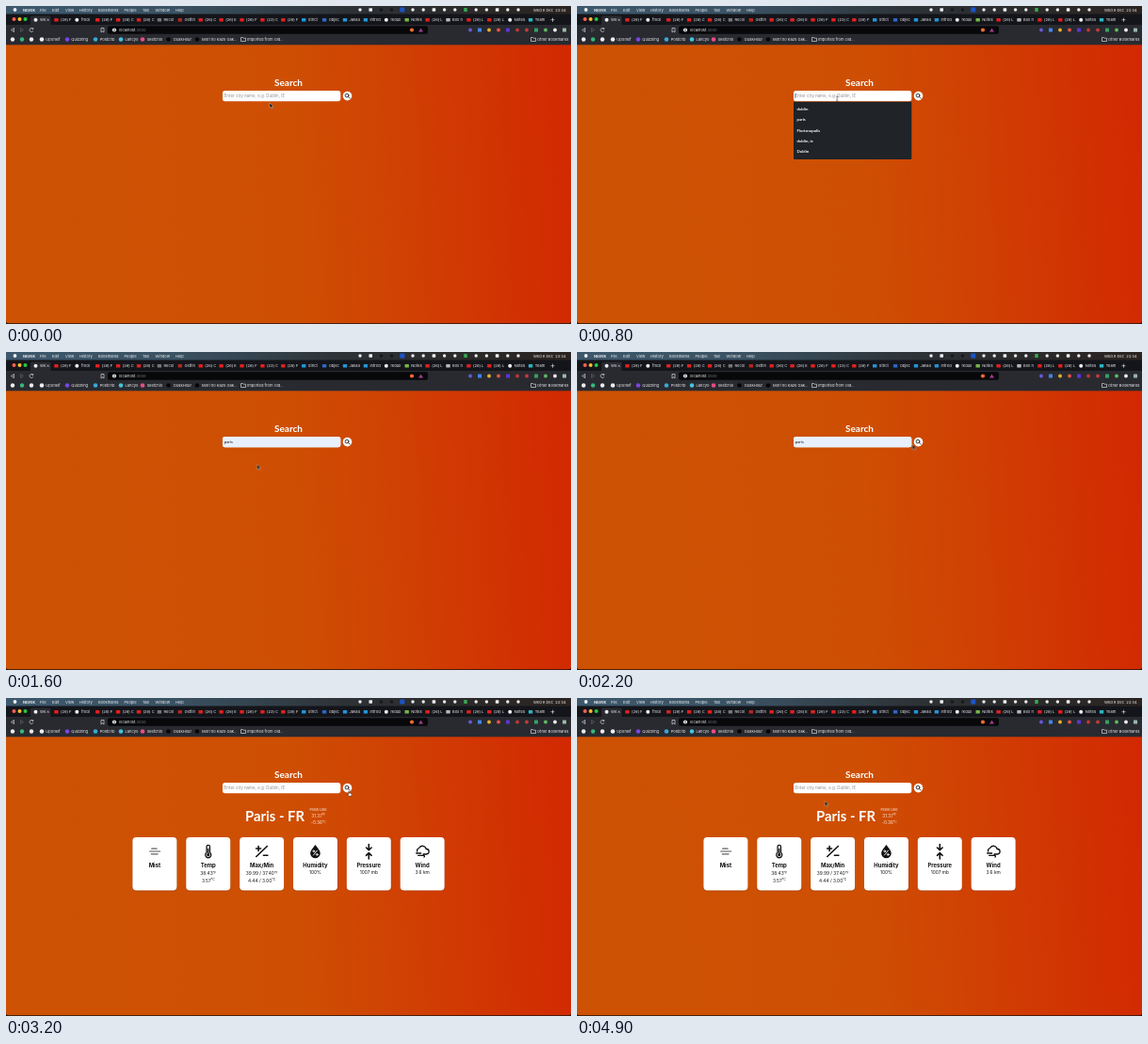
An HTML page for the animation above (5 s loop, 600x338 px).

```html
<!DOCTYPE html>
<html lang="en">
<head>
<meta charset="utf-8">
<title>Weather search</title>
<style>
html, body { margin: 0; width: 100%; height: 100%; overflow: hidden; background: #cf5204; }
svg { display: block; width: 100vw; height: 100vh; font-family: Inter, sans-serif; }
text { white-space: pre; }
.lato { font-family: Lato, sans-serif; font-weight: 700; fill: #fff; }
.mid { text-anchor: middle; }
.ui { font-size: 4.05px; fill: #eceef0; }
.line { fill: none; stroke: #111; stroke-width: 1.3; stroke-linecap: round; stroke-linejoin: round; }

.step { animation: 5s step-end infinite; }
#menu { animation-name: menu; }
#caret { animation-name: menu; }
#hint { animation-name: hint; }
#filled { animation-name: filled; }
#first { animation-name: first; }
#second { animation-name: second; }
#loading { animation-name: loading; }
#result { animation-name: result; }
#arrow { animation-name: arrow; }
#beam { animation-name: beam; }
#hand { animation-name: hand; }
#row { animation-name: row; }
@keyframes menu { 0%, 30% { visibility: hidden } 12% { visibility: visible } }
@keyframes hint { 0%, 54% { visibility: visible } 20% { visibility: hidden } }
@keyframes filled { 0%, 54% { visibility: hidden } 20% { visibility: visible } }
@keyframes first { 0%, 28% { visibility: hidden } 20% { visibility: visible } }
@keyframes second { 0%, 54% { visibility: hidden } 28% { visibility: visible } }
@keyframes row { 0%, 30% { visibility: hidden } 20% { visibility: visible; transform: none } 28% { visibility: visible; transform: translateY(11.3px) } }
@keyframes loading { 0%, 60% { visibility: hidden } 54% { visibility: visible } }
@keyframes result { 0% { visibility: hidden } 60%, 100% { visibility: visible } }
@keyframes arrow { 0%, 20%, 90% { visibility: visible } 10%, 46% { visibility: hidden } }
@keyframes beam { 0%, 20% { visibility: hidden } 10% { visibility: visible } }
@keyframes hand { 0%, 90% { visibility: hidden } 46% { visibility: visible } }

#cursor { animation: move 5s infinite; }
@keyframes move {
  0%, 6% { transform: translate(280px, 103px); animation-timing-function: steps(3) }
  12%, 18% { transform: translate(276.3px, 98.5px); animation-timing-function: steps(3) }
  24% { transform: translate(268.3px, 114px); animation-timing-function: steps(3) }
  30%, 32% { transform: translate(266.6px, 119.5px); animation-timing-function: steps(4) }
  40% { transform: translate(345px, 101px); animation-timing-function: steps(3) }
  46%, 54% { transform: translate(362px, 97px); animation-timing-function: steps(5) }
  64%, 88% { transform: translate(364.3px, 99px); animation-timing-function: steps(4) }
  96%, 100% { transform: translate(263.3px, 109.5px) }
}
</style>
</head>
<body>
<svg viewBox="0 0 600 338" preserveAspectRatio="none">
  <defs>
    <linearGradient id="sky" gradientUnits="userSpaceOnUse" x1="0" y1="200" x2="600" y2="172">
      <stop offset="0" stop-color="#cd5203"/>
      <stop offset=".5" stop-color="#ce4f04"/>
      <stop offset=".72" stop-color="#d03f03"/>
      <stop offset="1" stop-color="#d22902"/>
    </linearGradient>
    <linearGradient id="bar">
      <stop offset="0" stop-color="#3d586c"/>
      <stop offset=".3" stop-color="#3a5263"/>
      <stop offset=".6" stop-color="#2d3236"/>
      <stop offset="1" stop-color="#2a2320"/>
    </linearGradient>
  </defs>

  <rect width="600" height="338" fill="#1c1210"/>
  <rect width="600" height="337.3" rx="2.500" fill="url(#sky)"/>

  <g id="chrome">
    <rect width="600" height="9" fill="url(#bar)"/>
    <rect y="8.500" width="600" height="12" fill="#14151a"/>
    <rect y="20" width="600" height="21.300" fill="#292a30"/>
    <path d="M26 20.500V12q0-1.500 1.500-1.500H46q1.500 0 1.500 1.500v8.500z" fill="#292a30"/>
    <rect x="108" y="21.300" width="340" height="8.500" rx="2" fill="#08080a"/>
    <g fill="none" stroke="#d5d7da" stroke-width=".7">
      <path d="M8.500 23.500L5.500 25.500l3 2z"/>
      <path d="M15.500 23.500l3 2-3 2z" stroke="#62656c"/>
      <path d="M28.600 24.200a2 2 0 1 0 .3 2M28.800 23v1.500h-1.500"/>
      <path d="M101 23.500h3v4.500l-1.500-1.200-1.500 1.200z"/>
      <path d="M43.600 13.700l2 2m0-2l-2 2M580.500 12.700v4m-2-2h4"/>
      <path d="M249.500 33.500h2l.6.7h2.400v3.300h-5zM557.500 33.500h2l.6.7h2.400v3.300h-5z"/>
    </g>
    <circle cx="115" cy="25.500" r="2.100" fill="#e8eaed"/>
    <path d="M115 24.300v2.500" stroke="#17181d" stroke-width=".7"/>
    <text class="ui" x="120" y="27">localhost<tspan fill="#777b82">:3000</tspan></text>
  </g>

  <text class="lato mid" x="300" y="85" font-size="10">Search</text>
  <rect x="230" y="90" width="125.300" height="11.200" rx="2.600" fill="#fff"/>
  <text id="hint" class="step" x="231.700" y="97.200" font-size="4.480" fill="#8c8c8c">Enter city name, e.g: Dublin, IE</text>
  <rect id="filled" class="step" x="230" y="90" width="125.300" height="11.200" rx="2.600" fill="#e8f0fe"/>
  <g font-family="Lato, sans-serif" font-size="4.300" fill="#111">
    <text id="first" class="step" x="231.800" y="97">dublin</text>
    <text id="second" class="step" x="231.800" y="97">paris</text>
  </g>
  <path id="caret" class="step" d="M231.700 93v5" stroke="#222" stroke-width=".5"/>
  <circle cx="362.500" cy="95.600" r="4.800" fill="#fff"/>
  <g class="line" style="stroke-width:.8"><circle cx="362" cy="95.100" r="1.900"/><path d="M363.500 96.600l1.500 1.500"/></g>

  <g id="menu" class="step">
    <rect x="230" y="101.700" width="125.300" height="61.300" rx=".8" fill="#202327"/>
    <rect id="row" class="step" x="230" y="104" width="125.300" height="11.300" fill="#414545"/>
    <g id="options" class="lato" font-size="4.300"></g>
  </g>

  <text id="loading" class="lato step" x="0" y="120.700" font-size="7.600">Loading...</text>

  <g id="result" class="step">
    <text class="lato" x="254" y="131.300" font-size="14.850">Paris - FR</text>
    <g class="mid" fill="#fbe9df">
      <text x="331.500" y="119.600" font-size="3.900">Feels Like</text>
      <g id="feels"></g>
    </g>
    <g id="cards"></g>
  </g>

  <g id="cursor">
    <path id="arrow" class="step" d="M0 0v5.200l1.200-1 .8 1.800 1-.4-.8-1.800h1.700z" fill="#111" stroke="#ddd" stroke-width=".4"/>
    <path id="beam" class="step" d="M-1-2.500q1 0 1 .7v4.100q0 .7-1 .7M1-2.500q-1 0-1 .7m0 4.100q0 .7 1 .7" fill="none" stroke="#222" stroke-width=".6"/>
    <path id="hand" class="step" d="M-.5 0q.5-.6 1 0v2l2 .5q.6.300.3 1.200l-.5 1.800h-2.300l-1.500-2 .3-.5.700.5z" fill="#fff" stroke="#111" stroke-width=".5"/>
  </g>
</svg>
<script>
const $ = id => document.getElementById(id);
const add = (id, markup) => $(id).insertAdjacentHTML('beforeend', markup);
const label = (x, y, text, extra = '') => `<text x="${x}" y="${y}" ${extra}>${text}</text>`;
const ui = (x, y, text, extra = '') => label(x, y, text, 'class="ui" ' + extra);
const dot = (x, y, color, r = 2) => `<circle cx="${x}" cy="${y}" r="${r}" fill="${color}"/>`;
const box = (x, y, color, w = 4.4, h = 3.6) =>
  `<rect x="${x - w / 2}" y="${y - h / 2}" width="${w}" height="${h}" rx=".6" fill="${color}"/>`;
const white = '#eceef0', red = '#e02020', blue = '#2196d8';

// Menu bar
let menuBar = dot(9.5, 4, white, 1.9) + ui(18, 5.5, 'Nuvok', 'font-weight="700"');
Object.entries({ File: 36, Edit: 49, View: 63, History: 78, Bookmarks: 98, People: 125.5, Tab: 145, Window: 158.5, Help: 180 })
  .forEach(([name, x]) => menuBar += ui(x, 5.5, name));
for (let i = 0; i < 16; i++) {
  const x = 376 + i * 11.2;
  menuBar += i == 4 ? box(x, 4, '#1c55c8', 5, 5) : i == 10 ? box(x, 4, '#39a852', 3.5, 4)
    : i % 3 == 1 ? box(x, 4, white, 3.6, 3.4) : dot(x, 4, i == 2 || i == 3 ? '#15191f' : white, 1.7);
}
add('chrome', menuBar + ui(560, 5.5, 'Wed 9 Dec  23:04'));

// Tabs
const tabs = 'We,(26) F,frodi,(26) F,(26) C,(26) C,Recoi,Gettin,(26) C,(26) E,(26) F,(23) C,(26) F,Strict,Objec,JavaS,Introd,redux,Notes,(26) L,Box n,(26) L,(26) L,Notes,Team'.split(',');
const tabIcon = {
  0: white, 2: white, 6: '#777', 7: '#b3261e', 13: blue, 14: '#2b68c9', 15: blue,
  16: blue, 17: white, 18: '#74b843', 20: '#b5b8bd', 23: white, 24: '#29b6c5'
};
let strip = ['#ff5f57', '#febc2e', '#28c840'].map((c, i) => dot(8.5 + i * 6, 14, c)).join('');
tabs.forEach((name, i) => {
  const x = 31.5 + i * 21.9;
  const color = tabIcon[i] || red;
  strip += color == white ? dot(x, 14.8, color) : box(x, 14.8, color);
  strip += ui(x + 4.6, 16.4, name);
});
add('chrome', strip);

// Toolbar buttons
const tools = ['#6b58d8', '#4285e8', '#e6b02e', '#e25545', '#5b35d5', '#c43434', '#c33b3b', '#35a163', '#5dbb63', white, '#9ab8a8'];
add('chrome', dot(431, 25.5, '#f26a2e', 2.1) + '<path d="M438 27.500l2.500-4 2.500 4z" fill="#a03b8c"/>' +
  tools.map((c, i) => i % 3 == 1 ? box(493 + i * 10, 25.5, c, 4, 4.2) : dot(493 + i * 10, 25.5, c, 1.9)).join(''));

// Bookmarks
const marks = [
  [38, white, 'UpShelf', 42.3], [65, '#7a45e5', 'Quizzling', 69.3], [95, '#38a8d8', 'Postcrib', 99.7],
  [122, '#42c4dd', 'Lancyo', 126.5], [145, '#ea4c89', 'Sketchio', 149.7],
  [172.5, '#050505', 'DuskHour', 178], [203, '#050505', 'Mori no Kaze Gak...', 208]
];
add('chrome', dot(7, 35.5, white, 2.2) + dot(17, 35.5, '#35b779', 2.2) + dot(27, 35.5, white, 2.2) +
  marks.map(([x, c, name, tx]) => dot(x, 35.5, c, 2.3) + ui(tx, 36.9, name)).join('') +
  ui(256.2, 36.9, 'Imported from Old...') + ui(564, 36.9, 'Other Bookmarks'));

// Suggestions
['dublin', 'paris', 'Florianopolis', 'dublin, ie', 'Dublin'].forEach((name, i) =>
  add('options', label(233.5, 111 + i * 11.3, name)));

// Weather cards
const degrees = (n, unit) => `${n}<tspan dy="-1.700" font-size="3.400">°${unit}</tspan>`;
add('feels', label(331.8, 127, degrees('31.37', 'F'), 'font-size="4.700"') +
  label(331.8, 134.2, degrees('-0.36', 'C'), 'font-size="4.700"'));

const cards = [
  ['Mist', [], '<path class="line" style="stroke:#8d8d8d;stroke-width:1.700" d="M-3-2.800H2M-5 0H5.500M-3.500 2.800H3"/>'],
  ['Temp', [degrees('38.43', 'F'), degrees('3.57', 'C')],
    '<path class="line" d="M-1.700 1.300V-5a1.700 1.700 0 0 1 3.400 0V1.300a3 3 0 1 1-3.400 0z"/><circle cy="3.700" r="1.600"/><path class="line" d="M0 3V-2.500"/>'],
  ['Max/Min', [degrees('39.99 / 37.40', 'F'), degrees('4.44 / 3.00', 'C')],
    '<path class="line" style="stroke-width:1.600" d="M-5.800 5.500L5.800-5.500M-3.500-5.500v5M-6-3h5M1.800 4.300h4.500"/>'],
  ['Humidity', ['100%'],
    '<path d="M0-7C2-4 5.300-1 5.300 2A5.300 5.300 0 0 1-5.300 2C-5.300-1-2-4 0-7z"/><g class="line" style="stroke:#fff;stroke-width:.9"><path d="M-2 4L2-1"/><circle cx="-1.700" cy="-.2" r=".9"/><circle cx="1.800" cy="3.400" r=".9"/></g>'],
  ['Pressure', ['1007 mb'],
    '<path class="line" style="stroke-width:1.600" d="M0-7.500v6M-2.800-4L0-1.300 2.800-4M0 8V2M-2.800 4.300L0 1.600 2.800 4.300"/>'],
  ['Wind', ['3.6 km'],
    '<path class="line" d="M-5.500 0A3 3 0 0 1-3.500-3.500 4 4 0 0 1 4-2.500 2.700 2.700 0 0 1 4.500 3H1M-6.500 2H-1.500M-4.500 4.300H1.500q1.500.5.300 1.800"/>']
];
cards.forEach(([title, values, icon], i) => {
  const x = 157.9 + i * 56.85;
  add('cards', `<g class="mid" transform="translate(${x})" fill="#111">
    <rect x="-23.800" y="148.600" width="47.600" height="56.900" rx="4.300" fill="#7a2a00" opacity=".35"/>
    <rect x="-23.500" y="148" width="47" height="56.500" rx="4" fill="#fff"/>
    <g transform="translate(0 163)">${icon}</g>
    ${label(0, 179.6, title, 'font-size="5.900" font-weight="700"')}
    ${values.map((v, n) => label(0, (values.length > 1 ? 188.4 : 187.1) + n * 7.2, v, 'font-size="4.800"')).join('')}
  </g>`);
});
</script>
</body>
</html>
```
